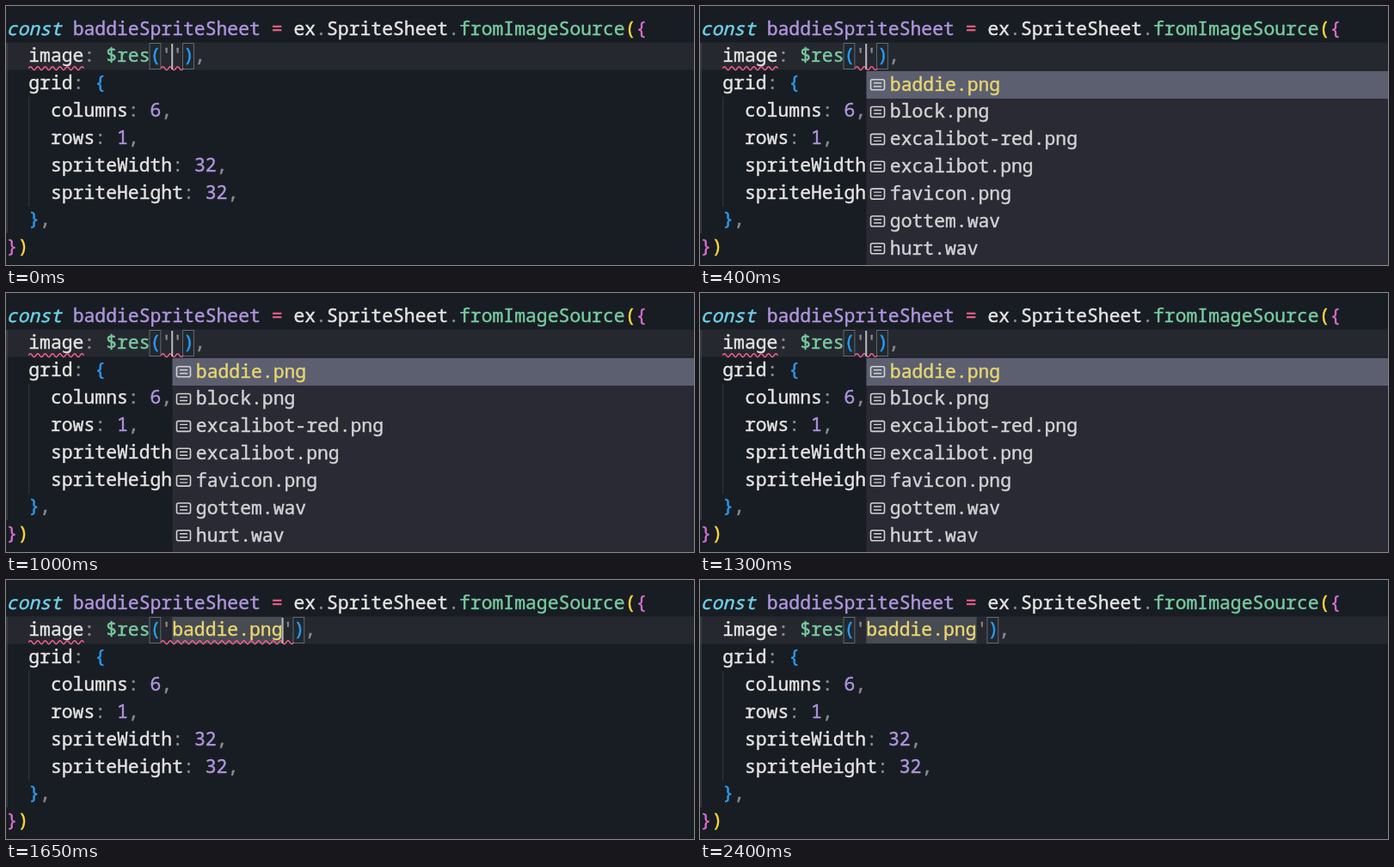
These frames come from a looping animation (800 px wide and 302 px high, 2450 ms). An HTML page:

```html
<!DOCTYPE html>
<html lang="en">
<head>
<meta charset="utf-8">
<title>Path completion</title>
<style>
  html, body { margin: 0; width: 100%; height: 100%; overflow: hidden; background: #181d23; }
  svg { display: block; }
  text {
    font: 21.4px "Noto Sans Mono", "DejaVu Sans Mono", monospace;
    white-space: pre;
    stroke-width: 0.45;
  }
  .italic { font-style: italic; }
</style>
</head>
<body>
<svg id="stage" width="800" height="302" viewBox="0 0 800 302"></svg>
<script>
const CHAR = 12.84, LINE = 31.85, LEFT = 0.6;
const LOOP = 2450, OPEN = 100, ACCEPT = 1650, RESOLVED = 2200;
const WORD = 'baddie.png';
const C = {
  text: '#e6e4e1', gray: '#8b8b91', cyan: '#6fd3ea', purple: '#b095de', pink: '#ec5f88',
  green: '#78cba1', yellow: '#e9d670', gold: '#ffd83d', orchid: '#d86fce', blue: '#2a9df4'
};
const stage = document.getElementById('stage');
const colX = col => LEFT + col * CHAR;
const baseY = row => 33.5 + row * LINE;

function add(parent, tag, attrs, content = '') {
  const el = document.createElementNS('http://www.w3.org/2000/svg', tag);
  for (const key in attrs) el.setAttribute(key, attrs[key]);
  el.textContent = content;
  return parent.appendChild(el);
}
const group = () => add(stage, 'g', {});
const rect = (parent, x, y, width, height, fill, more) =>
  add(parent, 'rect', { x, y, width, height, fill, ...more });
// A thin stroke gives the text a medium weight.
const label = (parent, x, y, color, content) =>
  add(parent, 'text', { x, y, fill: color, stroke: color }, content);

// Tokens are written as alternating colour names and strings.
function code(parent, row, col, ...tokens) {
  for (let i = 0; i < tokens.length; i += 2) {
    const word = tokens[i + 1];
    const el = label(parent, colX(col), baseY(row), C[tokens[i]], word);
    if (word === 'const') el.setAttribute('class', 'italic');
    col += word.length;
  }
}
const bracketBox = (parent, col) =>
  rect(parent, colX(col) - 0.5, 43.5, CHAR, 30, '#20282f', { stroke: '#666970' });

function wave(col, chars) {
  const half = CHAR / 3;
  return `M${colX(col)} 72.7q${half / 2} -4 ${half} 0` + `t${half} 0`.repeat(chars * 3 - 1);
}
const squiggle = parent =>
  add(parent, 'path', { fill: 'none', stroke: '#ee5f88', 'stroke-width': 1.5 });
const show = (el, on) => el.setAttribute('visibility', on ? 'visible' : 'hidden');

rect(stage, 0, 42.5, 800, 32, '#26282f');
rect(stage, 0.5, 43, 1.2, 222, '#45484e');
rect(stage, 26, 106, 1.2, 128, '#30343a');

const base = group();
code(base, 0, 0, 'cyan', 'const', 'text', ' ', 'purple', 'baddieSpriteSheet', 'pink', ' = ',
  'text', 'ex', 'gray', '.', 'text', 'SpriteSheet', 'gray', '.', 'green', 'fromImageSource',
  'gold', '(', 'orchid', '{');
bracketBox(base, 13);
code(base, 1, 2, 'text', 'image', 'gray', ': ', 'green', '$res', 'blue', '(', 'gray', "'");
code(base, 2, 2, 'text', 'grid', 'gray', ': ', 'blue', '{');
[['columns', 6], ['rows', 1], ['spriteWidth', 32], ['spriteHeight', 32]].forEach(([name, value], i) =>
  code(base, 3 + i, 4, 'text', name, 'gray', ': ', 'purple', String(value), 'gray', ','));
code(base, 7, 2, 'blue', '}', 'gray', ',');
code(base, 8, 0, 'orchid', '}', 'gold', ')');

const inserted = group();
rect(inserted, colX(15), 43, CHAR * WORD.length, 31, '#474b52');
code(inserted, 1, 15, 'yellow', WORD);

const tail = group();
bracketBox(tail, 16);
code(tail, 1, 15, 'gray', "'", 'blue', ')', 'gray', ',');

const errors = group();
squiggle(errors).setAttribute('d', wave(2, 5));
const stringError = squiggle(errors);
const caret = rect(stage, 0, 44, 2, 30, '#b9babd');

const popup = group();
rect(popup, 193.5, 75, 607, 228, '#2a2a35');
rect(popup, 193.5, 76, 607, 32, '#5b5f70');
[WORD, 'block.png', 'excalibot-red.png', 'excalibot.png', 'favicon.png', 'gottem.wav', 'hurt.wav']
  .forEach((name, i) => {
    const y = 91.7 + i * LINE;
    label(popup, 220.8, y + 6.8, i ? '#d2d2d4' : C.yellow, name);
    rect(popup, 198.5, y - 6, 16, 12, 'none', { rx: 2, stroke: '#d2d2d4', 'stroke-width': 1.6 });
    add(popup, 'path', { d: `M202 ${y - 2}h9m-9 4h9`, stroke: '#d2d2d4', 'stroke-width': 1.4 });
  });

function draw(now) {
  const t = now % LOOP;
  const accepted = t >= ACCEPT;
  const shift = accepted ? WORD.length : 0;
  show(popup, t >= OPEN && !accepted);
  show(inserted, accepted);
  show(errors, t < RESOLVED);
  show(caret, accepted ? t < ACCEPT + 500 : (t + 50) % 1000 < 500);
  tail.setAttribute('transform', `translate(${shift * CHAR})`);
  caret.setAttribute('x', colX(15 + shift) - 1);
  stringError.setAttribute('d', wave(14, 2 + shift));
  requestAnimationFrame(draw);
}
draw(performance.now());
</script>
</body>
</html>
```
